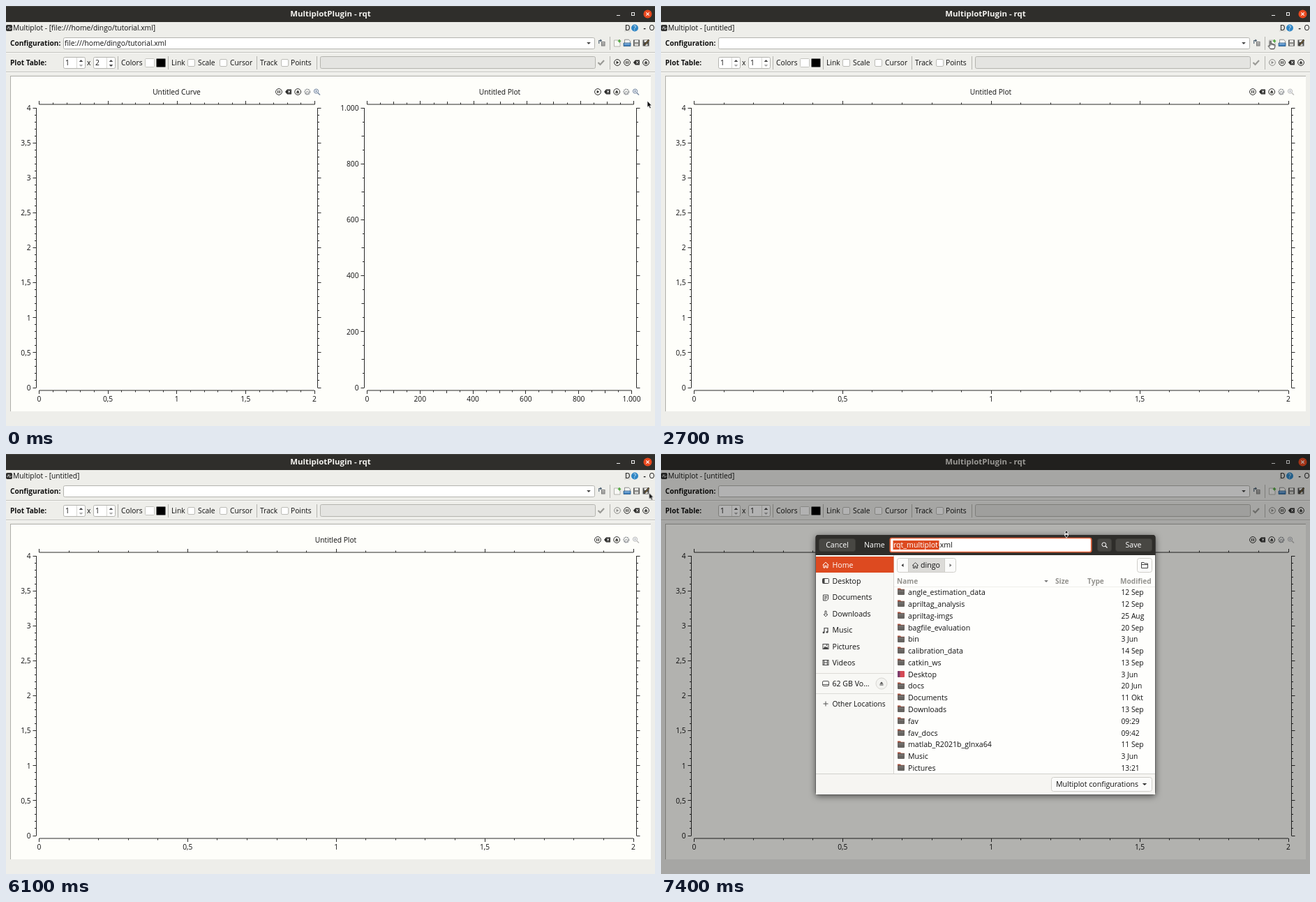
Write an HTML page that moves like this. It is 930 by 602 pixels and loops after 8 s.

```html
<!DOCTYPE html>
<html lang="en">
<head>
<meta charset="utf-8">
<title>Plot configuration</title>
<style>
html, body { margin: 0; width: 100%; height: 100%; overflow: hidden; background: #eeeeea; }
svg { display: block; width: 100vw; height: 100vh; }
text { font: 500 10.25px "Open Sans", "Noto Sans", sans-serif; fill: #111; white-space: pre; }
.b { font-weight: 700; font-size: 10.1px; }
.title { font-weight: 700; font-size: 11.45px; fill: #f4f3f0; animation: title 8s step-end infinite; }
.d { font-size: 10.6px; }
.w { fill: #fff; }
.head { font-weight: 700; font-size: 10.1px; fill: #94938f; }

.two, .one, .tip, .press1, .press2, .dim, .dialog, .arrow, .hand, .resize, .pointer {
  animation: 8s step-end infinite;
}
.two { animation-name: two; }
.one { animation-name: one; }
.tip { animation-name: tip; }
.press1 { animation-name: press1; }
.press2 { animation-name: press2; }
.dim { animation-name: dim; }
.dialog { animation-name: dialog; }
.arrow { animation-name: arrow; }
.hand { animation-name: hand; }
.resize { animation-name: resize; }
.pointer { animation-name: pointer; }

@keyframes title { 0% { fill: #f4f3f0; } 77.5%, 100% { fill: #dcdad5; } }
@keyframes two { 0% { opacity: 1; } 33.75%, 100% { opacity: 0; } }
@keyframes one { 0% { opacity: 0; } 33.75%, 100% { opacity: 1; } }
@keyframes tip { 0% { opacity: 0; } 23.75% { opacity: 1; } 31.25%, 100% { opacity: 0; } }
@keyframes press1 { 0% { opacity: 0; } 31.25% { opacity: 1; } 33.75%, 100% { opacity: 0; } }
@keyframes press2 { 0% { opacity: 0; } 71.25% { opacity: 1; } 73.75%, 100% { opacity: 0; } }
@keyframes dim {
  0% { opacity: 0; } 77.5% { opacity: .1; } 78.75% { opacity: .18; }
  80% { opacity: .25; } 81.25%, 100% { opacity: .3; }
}
@keyframes dialog { 0% { opacity: 0; } 77.5%, 100% { opacity: 1; } }
@keyframes arrow {
  0% { opacity: 1; } 12.5% { opacity: 0; } 76.25% { opacity: 1; } 92.5%, 100% { opacity: 0; }
}
@keyframes hand { 0% { opacity: 0; } 12.5% { opacity: 1; } 76.25%, 100% { opacity: 0; } }
@keyframes resize { 0% { opacity: 0; } 92.5%, 100% { opacity: 1; } }
@keyframes pointer {
  0% { transform: translate(919px, 136px); }
  2.5% { transform: translate(919px, 136px); animation-timing-function: steps(9); }
  13.75% { transform: translate(873.5px, 50px); }
  50% { transform: translate(873.5px, 52.5px); animation-timing-function: steps(4); }
  55% { transform: translate(894px, 69px); animation-timing-function: steps(4); }
  60% { transform: translate(921.5px, 58px); }
  61.25% { transform: translate(922px, 57px); }
  63.75% { transform: translate(922px, 55px); }
  67.5% { transform: translate(921.5px, 55.5px); }
  77.5% { transform: translate(921.5px, 55.5px); animation-timing-function: steps(7); }
  86.25% { transform: translate(665px, 91px); }
  87.5% { transform: translate(665px, 91px); animation-timing-function: steps(4); }
  92.5%, 100% { transform: translate(581px, 115px); }
}
</style>
</head>
<body>
<script>
const USER = 'dingo', INK = '#2b2b29', EDGE = '#b4b4af', ORANGE = '#dd4a20';

// y is the middle of the line of text
const text = (x, y, s, cls = '', anchor = 'start') =>
  `<text x="${x}" y="${y + 3.8}" class="${cls}" text-anchor="${anchor}">${s}</text>`;
const rect = (x, y, w, h, fill, stroke, rx = 0) => {
  const o = stroke ? .5 : 0;
  return `<rect x="${x + o}" y="${y + o}" width="${w - 2 * o}" height="${h - 2 * o}" rx="${rx}" fill="${fill}" stroke="${stroke || 'none'}"/>`;
};
const path = (d, fill = 'none', stroke = 'none', w = 1) =>
  `<path d="${d}" fill="${fill}" stroke="${stroke}" stroke-width="${w}"/>`;
const circle = (x, y, r, fill, stroke = 'none') =>
  `<circle cx="${x}" cy="${y}" r="${r}" fill="${fill}" stroke="${stroke}"/>`;
const at = (x, y, s) => `<g transform="translate(${x} ${y})">${s}</g>`;
const group = (cls, s) => `<g class="${cls}">${s}</g>`;
const down = (x, y, c = '#444', r = 2.8) => path(`M${x - r} ${y - r / 2}h${2 * r}l${-r} ${r}z`, c);
const up = (x, y, c = '#444', r = 2.8) => path(`M${x - r} ${y + r / 2}h${2 * r}l${-r} ${-r}z`, c);
const vline = (x, y1, y2, c = EDGE) => path(`M${x + .5} ${y1}V${y2}`, 'none', c);
const hline = (y, x1, x2, c = EDGE) => path(`M${x1} ${y + .5}H${x2}`, 'none', c);

// ---- toolbar icons, centred on their point ----
const ring = c => circle(0, 0, 4.4, 'none', c);
const icon = {
  play: (c = INK) => ring(c) + path('M-1.4 -2.3L2.3 0L-1.4 2.3z', c),
  pause: (c = INK) => ring(c) + path('M-1.3 -2V2M1.3 -2V2', 'none', c, 1.2),
  clear: (c = INK) => path('M-4.6 0L-1.6 -3.4H4.4V3.4H-1.6z', c) + path('M-.5 -1.6L2.7 1.6M2.7 -1.6L-.5 1.6', 'none', '#fff', 1.1),
  eject: (c = INK) => ring(c) + path('M-2.4 .7L0 -2.3L2.4 .7zM-2 1.3h4v.9h-4z', c),
  pan: (c = '#7c8085') => `<circle r="3.7" fill="none" stroke="${c}" stroke-width="1.4" stroke-dasharray="1.7 .9"/>` + path('M-2 3.2V.4Q0 -2 2 .4V3.2z', '#e9e9e8', c, .7),
  zoom: (c = '#71839c') => circle(-.9, -.9, 3.1, '#f2f5fa', c) + path('M1.5 1.5L4.6 4.4', 'none', c, 1.4) + path('M-2.5 -.9H.7M-.9 -2.5V.7', 'none', c, .8),
  page: () => path('M-4.5 -4H2L4 -2V5H-4.5z', '#f8f8f5', '#a5a5a0', .8) + path('M3 -5V-.6M.8 -2.8H5.2', 'none', '#4fa83d', 1.6),
  open: () => path('M-3.5 -4.8H2.5L4.5 -2.5V2H-3.5z', '#f4f4f2', '#777', .8) + path('M-5 0H5V4.6H-5z', '#3f7fbd', '#285680', .7) + path('M-4 1.4H4', 'none', '#a9cdee'),
  save: c => rect(-4.5, -4.5, 9, 9, c, '#555') + rect(-2.5, -4, 5, 3, '#e6e6e4') + rect(-2.5, 1, 5, 3, '#d3d3d0'),
  saveAs: () => icon.save('#4b4b48') + path('M-2.5 3.5L4.3 -4.5', 'none', '#222', 2.2) + path('M-1.5 2.6L4.3 -4.2', 'none', '#c79a4a', .9),
  reload: () => path('M-4.3 1V-3.5H-1M-2.5 -5L-.7 -3.5L-2.5 -2', 'none', '#4d6072', 1.1) + rect(-1, -2, 5.5, 6.5, '#e5e5e1', '#777') + path('M0 2.5H3.7M0 .5H3.7', 'none', '#555', .8)
};
const put = (name, x, y, c) => at(x, y, icon[name](c));

// ---- plots ----
function axis(across, a, b, pos, dir, major, minor) {
  const n = major * minor, mark = (u, v) => across ? `${u} ${v}` : `${v} ${u}`;
  let d = `M${mark(a, pos)}L${mark(b, pos)}`;
  for (let i = 0; i <= n; i++) {
    const u = Math.round(a + (b - a) * i / n - .5) + .5;
    const len = i % minor === 0 ? 5 : i % minor === minor / 2 ? 4 : 2.5;
    d += `M${mark(u, pos)}L${mark(u, pos + dir * len)}`;
  }
  return path(d, 'none', '#2a2a29');
}
const num = v => v >= 1000 ? '1.000' : String(v).replace('.', ',');

function plot(p) {
  const [left, right] = p.sides;
  let s = axis(true, left + 4, p.top, 141, -1, p.nx, p.minor)
        + axis(true, left + 4, p.bottom, 551, 1, p.nx, p.minor)
        + axis(false, 146, 547, left, -1, p.ny, p.minor)
        + axis(false, 146, 547, right, 1, p.ny, p.minor);
  for (let i = 0; i <= p.nx; i++)
    s += text(left + 4 + (p.bottom - left - 4) * i / p.nx, 563, num(i * p.step), '', 'middle');
  for (let i = 0; i <= p.ny; i++)
    s += text(left - 8, 547 - 401 * i / p.ny, num(i * p.step), '', 'end');
  s += text(p.mid, 123, p.name, '', 'middle');
  [p.run, 'clear', 'eject', 'pan', 'zoom'].forEach((k, i) =>
    s += put(k, p.icons + i * 13.6, 123, i === 4 ? p.zoom : undefined));
  return s;
}

// ---- main window ----
const spin = x => rect(x, 73, 32, 17, '#fff', EDGE, 2) + vline(x + 19, 74, 89, '#d5d5d1') + up(x + 25.5, 78.5);
const box = x => rect(x, 76, 11, 11, '#fff', '#bcbcb7', 1.5);

function frame() {
  let s = rect(0, 0, 930, 602, '#eeeeea') + rect(0, 0, 930, 23, '#2f2e2b') + hline(0, 0, 930, '#45433f')
    + text(465, 11.3, 'MultiplotPlugin - rqt', 'title', 'middle')
    + path('M875 13.5h5', 'none', '#eee') + rect(896, 9, 5, 5, 'none', '#eee')
    + circle(919.5, 11.5, 6, '#e9491f') + path('M917.3 9.3l4.4 4.4m0 -4.4l-4.4 4.4', 'none', '#fff', 1.1)
    + rect(0, 27, 9, 9, '#3c3c3a', '#222', 1) + path('M1 32h2l1 -2.5l1.5 4l1 -1.5h2', 'none', '#ddd', .8)
    + rect(886, 27, 9, 10, '#dededa') + text(887, 31.5, 'D') + circle(901, 31.5, 5, '#2f86c5')
    + `<text x="901" y="34.7" class="w" style="font-size:8.5px" text-anchor="middle">?</text>`
    + text(913.5, 31.5, '-', 'b') + text(921.5, 31.5, 'O')
    + text(6, 53, 'Configuration:', 'b') + rect(82, 45, 762, 17, '#fff', EDGE, 2) + down(835, 53.5)
    + put('reload', 854, 53)
    + hline(66, 0, 930, '#c3c3be') + hline(67, 0, 930, '#fafaf8')
    + hline(94, 0, 930, '#c3c3be') + hline(95, 0, 930, '#fafaf8')
    + text(6, 81.5, 'Plot Table:', 'b') + spin(82) + spin(125)
    + text(85, 81.5, '1') + text(116, 81.5, 'x') + down(107.5, 85.5, '#aaa')
    + text(165, 81.5, 'Colors') + rect(199, 75, 14, 13, '#fff', '#c4c4bf', 1) + rect(215, 75, 14, 13, '#000', '#777', 1)
    + text(237, 81.5, 'Link') + box(260) + text(275, 81.5, 'Scale') + box(306) + text(321, 81.5, 'Cursor')
    + text(364, 81.5, 'Track') + box(394) + text(408, 81.5, 'Points')
    + rect(450, 72, 395, 18, '#e4e4e1', EDGE, 2)
    + path('M848.5 81l3 3l5.5 -6', 'none', '#9a9a96', 2.2);
  for (const x of [160, 232, 359, 445, 865]) s += vline(x, 72, 91);
  s += vline(865, 44, 63);
  s += group('press1', rect(869, 46, 14, 14, '#d3d3cf', '#aaaaa5', 2)) + group('press2', rect(910, 46, 14, 14, '#d3d3cf', '#aaaaa5', 2));
  s += put('page', 876, 53) + put('open', 890, 53) + put('save', 903.5, 53, '#8b8b88') + put('saveAs', 917, 53);
  s += put('pause', 890, 81) + put('clear', 903.5, 81) + put('eject', 917, 81);
  s += rect(6, 101, 918, 480, '#fefefa') + vline(6, 101, 581, '#aeaea9') + hline(100, 6, 924, '#aeaea9');
  return s;
}

const url = `file:///home/${USER}/tutorial.xml`;
const twoPlots = text(10, 31.5, `Multiplot - [${url}]`) + text(84, 53, url)
  + text(128, 81.5, '2') + down(150.5, 85.5) + put('play', 876, 81)
  + plot({ sides: [43.5, 446.5], top: 442.5, bottom: 442, nx: 4, ny: 8, minor: 5, step: .5, mid: 244.5, name: 'Untitled Curve', run: 'pause', icons: 391 })
  + plot({ sides: [513.5, 903.5], top: 899.5, bottom: 896.5, nx: 5, ny: 5, minor: 4, step: 200, mid: 707.5, name: 'Untitled Plot', run: 'play', icons: 848 });
const onePlot = text(10, 31.5, 'Multiplot - [untitled]')
  + text(128, 81.5, '1') + down(150.5, 85.5, '#aaa') + put('play', 876, 81, '#8d8d8a')
  + plot({ sides: [43.5, 903.5], top: 899, bottom: 899, nx: 4, ny: 8, minor: 5, step: .5, mid: 472.5, name: 'Untitled Plot', run: 'pause', icons: 848, zoom: '#b9b9b7' });
const tip = rect(876, 64, 60, 16, 'rgba(0,0,0,.2)') + rect(874, 62, 64, 16, '#fdfce0', '#33332f') + text(877, 70, 'New configuration');

// ---- file dialog ----
const house = c => path('M-4.3 .3L0 -3.8L4.3 .3M-3 -.6V4H-1V1.2H1V4H3V-.6', 'none', c, 1);
const lens = c => circle(-.7, -.7, 2.9, 'none', c) + path('M1.5 1.5L4 4', 'none', c, 1.1);
const places = [
  ['Home', house('#fff')],
  ['Desktop', rect(-5, -4, 10, 8, 'none', '#444', 1) + rect(-4, -3, 2.5, 6, '#444')],
  ['Documents', path('M-3.5 -4H3.5V2L1.5 4H-3.5zM-2 -1.7H2M-2 .2H2M-2 2H0', 'none', '#444')],
  ['Downloads', path('M-1 -4V1H-3L0 4L3 1H1V-4z', 'none', '#444', .9)],
  ['Music', path('M-2 2.7V-3.5H3V2', 'none', '#444', 1.2) + circle(-3, 2.9, 1.4, '#444') + circle(2, 2.3, 1.4, '#444')],
  ['Pictures', rect(-4.5, -4, 9, 8, 'none', '#444') + path('M-3.5 3L-1 -.5L.7 1.3L2 0L3.5 3z', '#444') + circle(1.5, -1.8, .9, '#444')],
  ['Videos', rect(-4.5, -4, 9, 8, 'none', '#444') + path('M-2.3 -4V4M2.3 -4V4M-2 0H2', 'none', '#444')]
];
const files = `angle_estimation_data|12 Sep,apriltag_analysis|12 Sep,apriltag-imgs|25 Aug,bagfile_evaluation|20 Sep,bin|3 Jun,calibration_data|14 Sep,catkin_ws|13 Sep,Desktop|3 Jun,docs|20 Jun,Documents|11 Okt,Downloads|13 Sep,fav|09:29,fav_docs|09:42,matlab_R2021b_glnxa64|11 Sep,Music|3 Jun,Pictures|13:21`
  .split(',').map(f => f.split('|'));

function dialog() {
  let s = `<g filter="url(#shadow)">${rect(221.5, 116, 487, 372.5, '#3a3936', 0, 4)}</g>`
    + rect(222, 140, 486, 348, '#fefefc') + path('M221.5 145V120Q221.5 116 225.5 116H704.5Q708.5 116 708.5 120V145z', '#2e2d2a')
    + rect(226, 121, 53, 19, '#484743', '#3d3c38', 3) + text(252.5, 130.5, 'Cancel', 'd w', 'middle')
    + text(291, 130.5, 'Name', 'd w')
    + `<rect x="328.3" y="120.5" width="288.4" height="20" rx="2.5" fill="#fff" stroke="#e8663e" stroke-width="1.7"/>`
    + rect(332.5, 124, 66, 13, ORANGE)
    + text(333, 130.5, '<tspan fill="#fff">rqt_multiplot</tspan>.xml', 'd')
    + rect(625, 121, 21, 19, '#484743', '#3d3c38', 3) + at(635.5, 130.5, lens('#fff'))
    + rect(651, 121, 53, 19, '#484743', '#3d3c38', 3) + text(677, 130.5, 'Save', 'd w', 'middle')
    + rect(222, 145, 111, 314, '#f8f8f5') + vline(333, 145, 458, '#d5d4d0')
    + rect(222, 147, 111.5, 23, ORANGE);
  places.forEach(([name, art], i) => {
    const y = 158.7 + i * 23.45;
    s += at(236, Math.round(y), art) + text(245.5, y, name, i ? 'd' : 'd w');
  });
  s += hline(314, 222, 333, '#dcdbd7') + hline(343, 222, 333, '#dcdbd7')
    + rect(231, 325, 10, 8, 'none', '#555', 1.5) + path('M232 330.5h8', 'none', '#555')
    + text(245.5, 328.7, '62 GB Vo…', 'd')
    + circle(316, 329, 8, '#f3f3f0', '#d8d7d3') + path('M313.4 329.5L316 326.4L318.6 329.5zM313.4 330.4h5.2v1h-5.2z', '#444')
    + path('M232.5 358h7m-3.5 -3.5v7', 'none', '#555') + text(245.5, 357.7, 'Other Locations')
    + rect(338, 149, 85, 21, '#fbfbfa', '#cfcec9', 3) + rect(354, 150, 53, 19, '#dcdbd8')
    + vline(354, 150, 169, '#cfcec9') + vline(406, 150, 169, '#cfcec9')
    + path('M347.5 157v5l-3 -2.5z', '#333') + path('M413.5 157v5l3 -2.5z', '#777')
    + at(364.5, 159.5, house('#444')) + text(372, 159.5, USER, 'd')
    + rect(682, 149, 22, 21, '#fbfbfa', '#cfcec9', 3)
    + path('M688.5 163.5V155.5H692L693.2 157H697.5V163.5zM688.5 158.5H697.5', 'none', '#444')
    + text(338, 182, 'Name', 'head') + down(552, 182.5, '#777') + text(565, 182, 'Size', 'head')
    + text(611, 182, 'Type', 'head') + text(658, 182, 'Modified', 'head')
    + hline(190, 334, 708, '#efeeeb');
  files.forEach(([name, date], i) => {
    const y = 198.4 + i * 16.78, f = Math.round(y) - .5;
    s += name === 'Desktop'
      ? rect(339, f - 4.5, 10, 9, '#d44a55', 0, 1) + rect(339, f - 4.5, 3.5, 9, '#7d3c6c', 0, 1)
      : path(`M339 ${f - 5}h4l1 1.2h5v3h-10z`, '#a9503c') + rect(339, f - 3.2, 10, 7.7, '#676461', 0, 1) + path(`M340 ${f - 1}h8`, 'none', '#85817d', .8);
    s += text(354, y, name, 'd') + text(659.5, y, date);
  });
  return s + rect(222, 458, 486, 30, '#f6f5f2') + hline(458, 222, 708, '#d2d1cd')
    + rect(559, 463, 145, 21, '#fbfbfa', '#cfcec9', 3) + text(566, 473.5, 'Multiplot configurations', 'd') + down(693, 473.5, '#333', 3.2);
}

// ---- pointer shapes, origin at the hot spot ----
const pointer = group('arrow', path('M0 0V9.2L2.1 7.4L3.6 10.9L5.3 10.1L3.8 6.8H6.4z', '#111', '#fff', .7))
  + group('hand', path('M-.8 6.8V1Q-.8 .2 0 .2T.9 1V4.2Q2.6 3.6 2.8 4.6Q4.4 4.1 4.5 5.2Q6.1 4.9 6.1 6.2V8.2Q6 9.8 5 11.6H-.2Q-1.7 9.4 -3.2 7.5Q-3.2 6 -.8 7.6', '#fff', '#111', .95) + path('M1 4.2V6.3M2.8 4.7V6.5M4.5 5.2V6.7', 'none', '#111', .7))
  + group('resize', path('M0 -5.4L2.8 -2H.8V1H2.8L0 5.4L-2.8 1H-.8V-2H-2.8z', '#111', '#fff', .8) + path('M-3 .2h6', 'none', '#fff', 1.1));

document.body.innerHTML = `<svg viewBox="0 0 930 602" preserveAspectRatio="none">
<defs><filter id="shadow" x="-10%" y="-10%" width="120%" height="120%">
<feDropShadow dx="0" dy="2" stdDeviation="5" flood-color="#000" flood-opacity=".55"/></filter></defs>`
  + frame() + group('two', twoPlots) + group('one', onePlot) + group('tip', tip)
  + group('dim', rect(0, 0, 930, 602, '#000')) + group('dialog', dialog())
  + group('pointer', pointer) + '</svg>';
</script>
</body>
</html>
```
